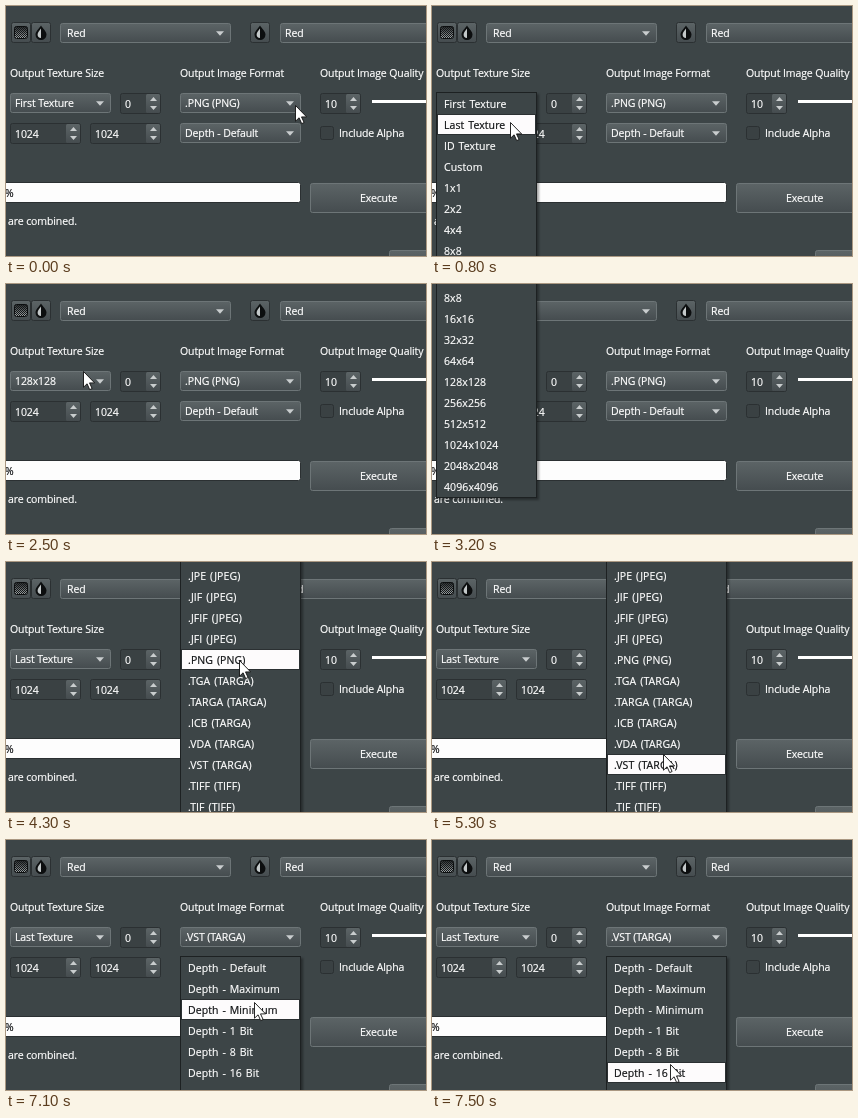
An HTML page for the animation above (8 s loop, 420x250 px).

```html
<!DOCTYPE html>
<html lang="en">
<head>
<meta charset="utf-8">
<title>Texture export settings</title>
<style>
  html, body { margin: 0; width: 100%; height: 100%; overflow: hidden; background: #3d4547; }
  svg { display: block; width: 420px; height: 250px; }
  text {
    font: 10.5px "Open Sans", "Noto Sans", sans-serif; letter-spacing: -.1px; white-space: pre;
    fill: #fff; stroke: #fff; stroke-width: .2px;
  }
  .box { fill: url(#raised); stroke: #6d7577; }
  .key { fill: url(#raised); stroke: #2b3032; }
  .field { fill: #3a4143; stroke: #2b3032; }
  .arrow { fill: #c9cdce; }
  .popup { filter: drop-shadow(2px 2px 1px rgba(0, 0, 0, .35)); }
  .popup text { letter-spacing: .1px; word-spacing: 1px; }
  .sheet { fill: #3d4547; stroke: #1d2122; }
  .row rect { fill: none; }
  .row.on rect { fill: #fdfbfc; stroke: #2b3032; }
  .row.on text, .ink { fill: #101214; stroke: #101214; }
</style>
</head>
<body>
<svg id="stage" viewBox="0 0 420 250">
  <defs>
    <linearGradient id="raised" x2="0" y2="1">
      <stop stop-color="#5c6466"/>
      <stop offset="1" stop-color="#454c4f"/>
    </linearGradient>
    <linearGradient id="fade" x2="0" y2="1">
      <stop stop-color="#26292a"/>
      <stop offset="1" stop-color="#a4aaab"/>
    </linearGradient>
    <pattern id="dots" width="2" height="2" patternUnits="userSpaceOnUse">
      <path d="M0 0h1v1h-1zM1 1h1v1h-1z" fill="#15181a"/>
    </pattern>
    <g id="drop">
      <path d="M0-7C2-4 5.5-1 5.5 2A5.5 5.5 0 0 1-5.5 2C-5.5-1-2-4 0-7Z" fill="#0c0e0f"/>
      <path d="M0-4C-1.4-2-3.4 0-3.4 2A3.4 3.4 0 0 0 0 5.4Z" fill="#c3c8c9"/>
    </g>
  </defs>
  <g id="panel"></g>
  <g id="popups"></g>
  <path id="cursor" d="M.5.5V16.2L4.1 12.8L6.7 18.6L9.1 17.5L6.5 11.9H11.6Z" fill="#fff" stroke="#111" stroke-width=".9"/>
</svg>
<script>
const LOOP = 8000, STEP = 100, ROW = 21;
const panel = document.getElementById('panel');
const popups = document.getElementById('popups');
const cursor = document.getElementById('cursor');

function add(parent, tag, attrs) {
  const el = document.createElementNS('http://www.w3.org/2000/svg', tag);
  for (const key in attrs) el.setAttribute(key, attrs[key]);
  return parent.appendChild(el);
}
function label(x, y, str, parent = panel, cls = '') {
  const el = add(parent, 'text', { x, y: y + 4, class: cls });
  el.textContent = str;
  return el;
}
function box(x, y, width, height, cls = 'box') {
  return add(panel, 'rect', { x: x + .5, y: y + .5, width: width - 1, height: height - 1, rx: 2, class: cls });
}
function arrow(x, y, half, rise) {
  add(panel, 'path', { d: `M${x - half} ${y - rise / 2}h${2 * half}l${-half} ${rise}z`, class: 'arrow' });
}
function combo(x, y, width, str, pad = 5) {
  box(x, y, width, 20);
  arrow(x + width - 11, y + 10.5, 4, 4.5);
  return label(x + pad, y + 10, str);
}
function spin(x, y, width, str) {
  box(x, y, width, 21, 'field');
  add(panel, 'rect', { x: x + width - 15, y: y + 1, width: 14, height: 19, rx: 1.5, fill: 'url(#raised)' });
  arrow(x + width - 7.5, y + 6, 3.5, -4);
  arrow(x + width - 7.5, y + 15, 3.5, 4);
  label(x + 5, y + 11, str);
}
function iconButton(x, icon) {
  box(x, 16, 20, 21, 'key');
  if (icon === 'drop') add(panel, 'use', { href: '#drop', x: x + 10, y: 26.5 });
  else {
    add(panel, 'rect', { x: x + 3.5, y: 20.5, width: 13, height: 12, rx: 2, fill: 'url(#fade)', stroke: '#0c0e0f' });
    add(panel, 'rect', { x: x + 4, y: 21, width: 12, height: 11, fill: 'url(#dots)' });
  }
}

// Static panel
iconButton(5, 'fade');
iconButton(25, 'drop');
iconButton(244, 'drop');
combo(54, 17, 171, 'Red', 7);
combo(274, 17, 171, 'Red');
label(4, 67, 'Output Texture Size');
label(174, 67, 'Output Image Format');
label(314, 67, 'Output Image Quality');
const sizeText = combo(4, 87, 101, '');
const formatText = combo(174, 87, 121, '');
combo(174, 117, 121, 'Depth - Default');
spin(114, 87, 41, '0');
spin(4, 117, 71, '1024');
spin(84, 117, 71, '1024');
spin(314, 87, 41, '10');
add(panel, 'rect', { x: 366, y: 94, width: 60, height: 3, fill: '#fff' });
box(314, 120, 14, 14, 'field');
label(333, 127, 'Include Alpha');
add(panel, 'rect', { x: -5, y: 176.5, width: 299.5, height: 20, rx: 2, fill: '#fdfdfd', stroke: '#2b3032' });
label(-1, 187, '%', panel, 'ink');
box(304, 177, 140, 30);
label(354, 192, 'Execute');
label(2, 215, 'are combined.');
box(383, 244, 60, 30);

// Drop-down lists
const square = n => `${n}x${n}`;
const sizes = ['First Texture', 'Last Texture', 'ID Texture', 'Custom',
  ...Array.from({ length: 13 }, (_, i) => square(2 ** i))];
const formats = [
  ...['JPG', 'JPE', 'JIF', 'JFIF', 'JFI'].map(e => `.${e} (JPEG)`), '.PNG (PNG)',
  ...['TGA', 'TARGA', 'ICB', 'VDA', 'VST'].map(e => `.${e} (TARGA)`),
  ...['TIFF', 'TIF'].map(e => `.${e} (TIFF)`)];
const depths = ['Default', 'Maximum', 'Minimum', '1 Bit', '8 Bit', '16 Bit', '24 Bit', '32 Bit']
  .map(d => `Depth - ${d}`);

// The list opens with its current item over the combo box.
function popup(from, to, x, y, width, items, current) {
  const top = y - current * ROW;
  const group = add(popups, 'g', { class: 'popup' });
  add(group, 'rect', { x: x + .5, y: top - .5, width: width - 1, height: items.length * ROW + 1, class: 'sheet' });
  const rows = items.map((str, i) => {
    const row = add(group, 'g', { class: 'row' });
    add(row, 'rect', { x: x + 1.5, y: top + i * ROW + .5, width: width - 3, height: ROW - 1 });
    label(x + 8, top + i * ROW + 11, str, row);
    return row;
  });
  return { from, to, top, group, rows };
}
const lists = [
  popup(600, 1300, 4, 87, 101, sizes, 0),
  popup(1600, 2200, 4, 87, 101, sizes, 2),
  popup(2700, 3900, 4, 87, 101, sizes, 11),
  popup(4300, 6000, 174, 87, 121, formats, 5),
  popup(6600, LOOP, 174, 117, 121, depths, 0)
];

// Pointer path: time, x, y
const path = [
  [0, 289, 99], [500, 79, 98], [600, 78, 98], [700, 78, 98], [900, 77, 134],
  [1300, 77, 134], [1500, 77, 97], [1600, 77, 97], [2000, 77, 275], [2200, 77, 275],
  [2500, 77, 87], [2700, 77, 87], [3200, 79, -21], [3800, 84, -21], [4200, 233, 98],
  [4400, 233, 98], [5300, 231, 192], [5900, 231, 192], [6500, 254, 122],
  [6800, 254, 122], [7500, 238, 224], [LOOP, 238, 224]
];
function pointer(t) {
  const i = path.findIndex(p => p[0] > t);
  const [t0, x0, y0] = path[i - 1], [t1, x1, y1] = path[i];
  const u = (t - t0) / (t1 - t0), k = u * u * (3 - 2 * u);
  return [Math.round(x0 + (x1 - x0) * k), Math.round(y0 + (y1 - y0) * k)];
}

function draw(t) {
  const [x, y] = pointer(t);
  cursor.setAttribute('transform', `translate(${x} ${y})`);
  sizeText.textContent = sizes[t < 1300 ? 0 : t < 2200 ? 2 : t < 3900 ? 11 : 1];
  formatText.textContent = formats[t < 6000 ? 5 : 10];
  for (const { from, to, top, group, rows } of lists) {
    const open = t >= from && t < to;
    group.style.display = open ? '' : 'none';
    if (!open) continue;
    const hover = Math.floor((y - top) / ROW);
    rows.forEach((row, i) => row.classList.toggle('on', i === hover));
  }
}

let start, last;
function tick(now) {
  start ??= now;
  const t = Math.floor((now - start) % LOOP / STEP) * STEP;
  if (t !== last) draw(last = t);
  requestAnimationFrame(tick);
}
draw(0);
requestAnimationFrame(tick);
</script>
</body>
</html>
```
